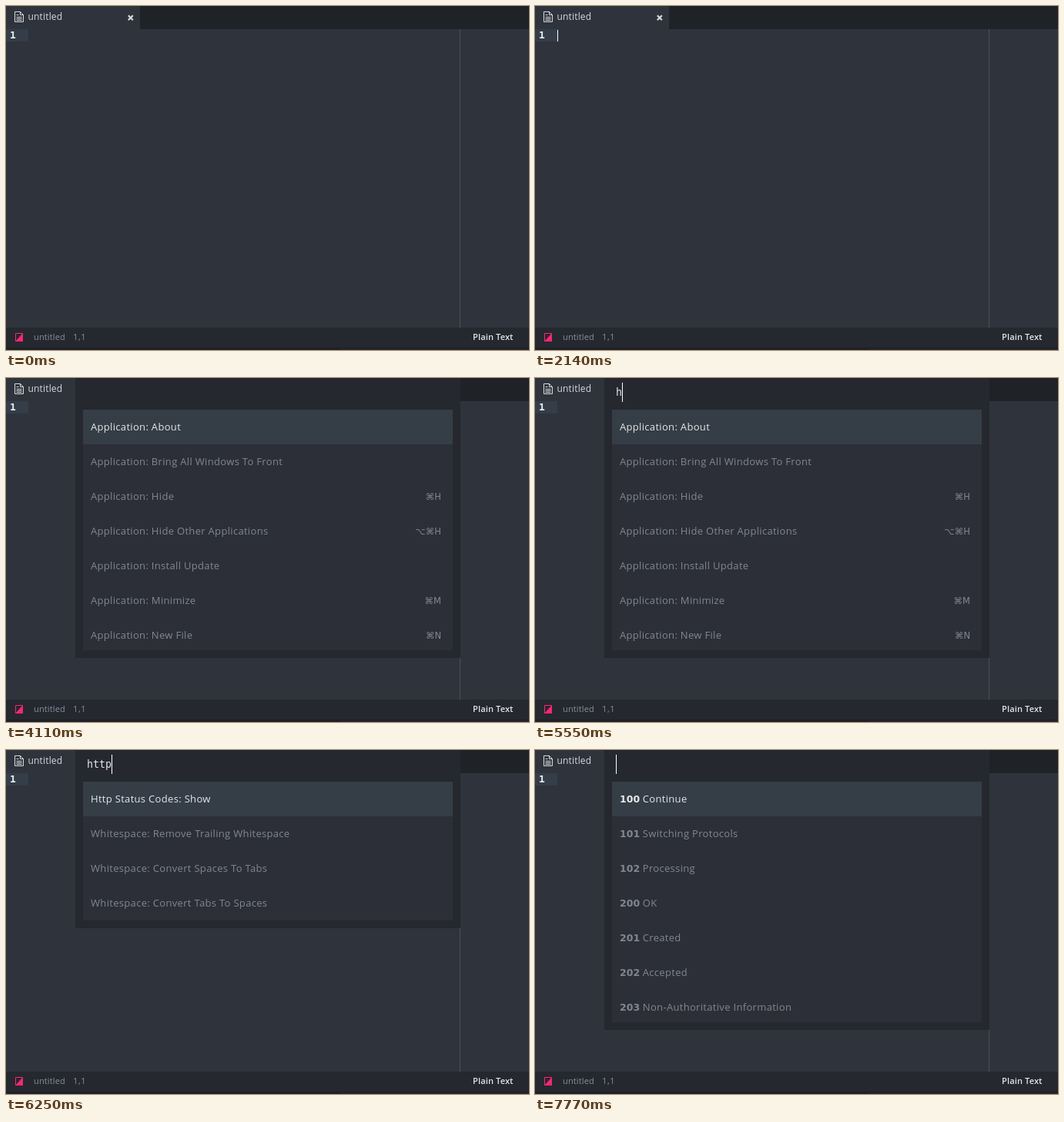
These frames come from a looping animation (679 px wide and 446 px high, 8 s). An HTML page:

```html
<!DOCTYPE html>
<html lang="en">
<head>
<meta charset="utf-8">
<title>Command palette</title>
<style>
html, body { margin: 0; width: 100%; height: 100%; overflow: hidden; background: #2f333c; }
svg { display: block; }
text { font: 500 13px "Open Sans", "DejaVu Sans", sans-serif; letter-spacing: .32px; white-space: pre; }
.tab { font-size: 12px; letter-spacing: .2px; fill: #d7dade; }
.status { font-size: 11px; letter-spacing: .15px; fill: #8490a2; }
.mode { font-weight: 600; fill: #e3e6ea; }
.mono { font-family: "DejaVu Sans Mono", monospace; letter-spacing: 0; }
.line { font-weight: bold; fill: #e8f3fa; }
.query { font-size: 13.3px; fill: #e3e6e9; }
.row { fill: #82878f; }
.row.on { fill: #e6e8ea; }
.row tspan { font: bold 12.5px "DejaVu Sans", sans-serif; letter-spacing: 0; }
.key { font: 11.5px "DejaVu Sans", sans-serif; letter-spacing: 0; text-anchor: end; fill: #82878f; }
</style>
</head>
<body>
<svg width="679" height="446" viewBox="0 0 679 446">
  <rect width="679" height="446" fill="#2f333c"/>
  <rect x="174" width="505" height="30" fill="#1f2226"/>
  <g fill="none" stroke="#d7dade">
    <path d="M11.5 7.5h7l4 4v9h-11zM18.5 7.5v4h4M13.5 11.5h3M13.5 14.5h7M13.5 16.5h7M13.5 18.5h7"/>
    <path d="M158.8 12.2l6 6m0-6l-6 6" stroke-width="2.2"/>
  </g>
  <text class="tab" x="28.4" y="18">untitled</text>

  <rect y="30" width="29" height="16" fill="#343d48"/>
  <text class="mono line" x="5" y="42">1</text>
  <rect x="589" y="30" width="1" height="387" fill="#4c5058"/>
  <rect id="caret" x="29" y="31" width="1" height="15" fill="#fff"/>

  <rect y="417" width="679" height="29" fill="#25282e"/>
  <rect y="443" width="679" height="1" fill="#1b1d21"/>
  <rect y="444" width="434" height="2" fill="#202328"/>
  <path d="M12.5 424.5h9v10h-9z" fill="none" stroke="#f92672"/>
  <path d="M22 424v11h-10z" fill="#f92672"/>
  <text class="status" x="36" y="433">untitled</text>
  <text class="status" x="87" y="433" style="letter-spacing:.6px">1,1</text>
  <text class="status mode" x="606" y="433">Plain Text</text>

  <g id="palette">
    <rect id="panel" x="90" width="500" fill="#25282e"/>
    <rect id="list" x="100" y="41" width="480" fill="#2c2f37"/>
    <rect x="100" y="41" width="480" height="45" fill="#353d46"/>
    <g id="rows"></g>
    <text id="query" class="mono query" x="105" y="23"></text>
    <rect id="cursor" y="6" width="1" height="25" fill="#fff"/>
  </g>
</svg>
<script>
const $ = id => document.getElementById(id);
const LOOP = 8000, ROW = 45, MAX_LIST = 312;

// "label|shortcut|further shortcut to the left"
const lists = {
  all: ["Application: About", "Application: Bring All Windows To Front", "Application: Hide|⌘H",
    "Application: Hide Other Applications|⌥⌘H", "Application: Install Update",
    "Application: Minimize|⌘M", "Application: New File|⌘N"],
  ht: ["Http Status Codes: Show", "Set Syntax: Html", "Set Syntax: Html (rails)",
    "Markdown Preview: Copy Html", "Set Syntax: Html (mustache)",
    "Set Syntax: Html (ruby Erb)", "Core: Move Right|^F|→"],
  http: ["Http Status Codes: Show", "Whitespace: Remove Trailing Whitespace",
    "Whitespace: Convert Spaces To Tabs", "Whitespace: Convert Tabs To Spaces"],
  codes: ["100 Continue", "101 Switching Protocols", "102 Processing", "200 OK",
    "201 Created", "202 Accepted", "203 Non-Authoritative Information"]
};

// [start time, value]
const listAt = [[0, ""], [4110, "all"], [5810, "ht"], [6160, "http"], [7770, "codes"]];
const queryAt = [[0, ""], [5550, "h"], [5720, "ht"], [5990, "htt"], [6080, "http"], [7770, ""]];
const caretAt = [[0, 0], [1970, 1], [2410, 0], [2770, 1], [3220, 0], [3570, 1], [4110, 0]];
const cursorAt = [[0, 0], [4290, 1], [4650, 0], [5100, 1], [5460, 0], [5550, 1],
  [6700, 0], [7050, 1], [7500, 0], [7770, 1]];

const valueAt = (track, t) => track.filter(([start]) => start <= t).pop()[1];
const show = (id, on) => $(id).style.display = on ? "" : "none";

function rowMarkup(item, i) {
  const [label, key, extra] = item.split("|");
  const y = 68 + ROW * i;
  const text = label.replace(/^\d+/, "<tspan>$&</tspan>");
  return `<text class="row${i ? "" : " on"}" x="110" y="${y}">${text}</text>` +
    (key ? `<text class="key" x="565" y="${y}">${key}</text>` : "") +
    (extra ? `<text class="key" x="533" y="${y}" style="font-size:14px">${extra}</text>` : "");
}

let shown;
function showList(name) {
  if (name === shown) return;
  shown = name;
  show("palette", name);
  const items = lists[name] || [];
  const height = Math.min(items.length * ROW, MAX_LIST);
  $("list").setAttribute("height", height);
  $("panel").setAttribute("height", height + 51);
  $("rows").innerHTML = items.map(rowMarkup).join("");
}

function draw(now) {
  const t = now % LOOP;
  const query = valueAt(queryAt, t);
  showList(valueAt(listAt, t));
  $("query").textContent = query;
  $("cursor").setAttribute("x", 105 + 8 * query.length);
  show("cursor", valueAt(cursorAt, t));
  show("caret", valueAt(caretAt, t));
}

const begin = performance.now();
function tick() {
  draw(performance.now() - begin);
  requestAnimationFrame(tick);
}
tick();
</script>
</body>
</html>
```
